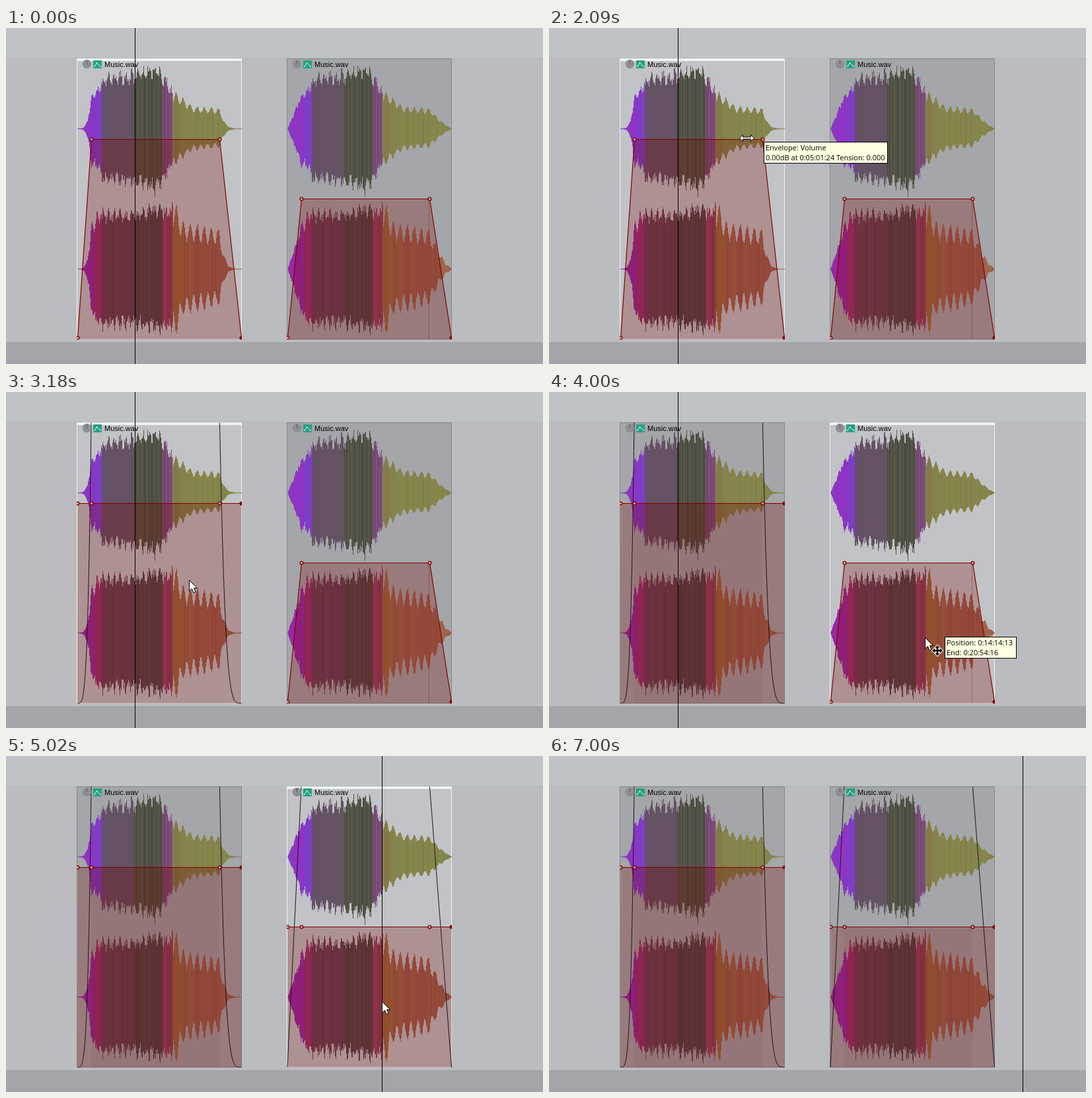
These frames come from a looping animation (813x508 px, 7.72 s). An HTML page with a canvas:

```html
<!DOCTYPE html>
<html lang="en">
<head>
<meta charset="utf-8">
<title>Volume envelope to item fades</title>
<style>
  html, body { margin: 0; width: 100%; height: 100%; overflow: hidden; background: #bbbcc0; }
  canvas { display: block; }
</style>
</head>
<body>
<canvas id="stage" width="813" height="508"></canvas>
<script>
const ctx = document.getElementById('stage').getContext('2d');
const LOOP = 7720, SELECT = 3998, DROP = 4100, DESELECT = 6120;
const TOP = 46, BOTTOM = 471, WIDTH = 250;
const FADE_IN = 21, FADE_OUT = 33, LENGTH = 248;
const RED = '#800000';

// Loudness as a few [x, height] points; each zone mixes a base and an accent colour.
const ZONES = [0, 25, 37, 85, 129, 144, 160];
const channels = [
  {
    mid: 152.5, dip: 0.25,
    loud: [[0, 57], [25, 60], [40, 88], [85, 92], [118, 105], [129, 90], [145, 60], [175, 35], [215, 32], [248, 20]],
    base: ['#9430c4', '#8a38d0', '#5c5a52', '#444640', '#8a4e86', '#8a6a48', '#80904c'],
    accent: ['#8040c8', '#6a48b0', '#6e4a78', '#5c5c4a', '#6a4868', '#7f8f4a', '#8a7a4c']
  },
  {
    mid: 364.5, dip: 0.38,
    loud: [[0, 68], [21, 72], [32, 94], [85, 95], [115, 103], [152, 102], [158, 75], [215, 62], [248, 30]],
    base: ['#a420ac', '#b03460', '#544648', '#464440', '#a84668', '#98783c', '#a06f4b'],
    accent: ['#9030a0', '#8a3080', '#78405f', '#644850', '#784058', '#a06040', '#9a5850']
  }
];

const items = [
  { x: 107, envY: 168, curve: 4, fadesAt: 3180, selected: t => t < SELECT },
  { x: 425, envY: 258, curve: 1, fadesAt: 5020, seam: true, selected: t => t >= SELECT && t < DESELECT }
];

const moves = [
  { from: 1370, to: 2090, steps: 13, pts: [[225, 428], [216, 350], [262, 215], [299, 167]] },
  { from: 2160, to: 2620, steps: 8, pts: [[307, 159], [300, 190], [277, 284]] },
  { from: 3620, to: SELECT, steps: 7, pts: [[277, 284], [569, 371]] },
  { from: 5520, to: 5940, steps: 6, pts: [[570, 371], [641, 435], [783, 283], [717, 266]] },
  { from: 6650, to: 7000, steps: 6, pts: [[717, 266], [742, 341], [759, 181]] }
];

const noise = n => { const v = Math.sin(n * 12.9898) * 43758.5453; return v - Math.floor(v); };

function level(pts, x) {
  const i = Math.max(1, pts.findIndex(p => p[0] >= x));
  const [x0, y0] = pts[i - 1], [x1, y1] = pts[i];
  return y0 + (y1 - y0) * (x - x0) / (x1 - x0);
}

function along(pts, u) {
  const s = u * (pts.length - 1), i = Math.min(Math.floor(s), pts.length - 2), f = s - i;
  return [0, 1].map(k => Math.round(pts[i][k] + (pts[i + 1][k] - pts[i][k]) * f));
}

function rect(x, y, w, h, color) {
  ctx.fillStyle = color;
  ctx.fillRect(x, y, w, h);
}

function path(pts, { fill, stroke, width = 1, close = false }) {
  ctx.beginPath();
  pts.forEach(([x, y]) => ctx.lineTo(x, y));
  if (close) ctx.closePath();
  if (fill) { ctx.fillStyle = fill; ctx.fill(); }
  if (stroke) { ctx.strokeStyle = stroke; ctx.lineWidth = width; ctx.stroke(); }
}

function dot(x, y, r, fill, stroke) {
  ctx.beginPath();
  ctx.arc(x, y, r, 0, 7);
  ctx.fillStyle = fill;
  ctx.fill();
  if (stroke) { ctx.strokeStyle = stroke; ctx.lineWidth = 1.3; ctx.stroke(); }
}

function text(s, x, y, font) {
  ctx.fillStyle = '#000';
  ctx.font = font;
  ctx.fillText(s, x, y);
}

const gain = (x, curve) => Math.min(1, x / FADE_IN, (LENGTH - x) / FADE_OUT) ** curve;

// Ragged spikes in the loud part, slow and regular ones in the tail.
function ripple(x, dip, seed) {
  const tail = x > 144;
  const beat = Math.cos(Math.PI * (x - 160) / (tail ? 10.6 : 8.7)) ** 2;
  return 1 - (tail ? dip : 0.14) * (1 - beat) - (tail ? 0.08 : 0.17) * noise(x + seed);
}

function drawWave(item) {
  channels.forEach((ch, c) => {
    for (let x = 0; x <= LENGTH; x++) {
      const height = level(ch.loud, x) * gain(x, item.curve);
      const up = height * ripple(x, ch.dip, 300 + c * 900);
      const down = height * ripple(x, ch.dip, 600 + c * 900) * (1 - 0.15 * (x / LENGTH) ** 3);
      const zone = ZONES.filter(z => z <= x).length - 1;
      const column = [item.x + 1 + x, ch.mid - 0.5 - up, 1, up + down + 1];
      rect(...column, ch.base[zone]);
      ctx.globalAlpha = noise(x + 50 + c * 400);
      rect(...column, ch.accent[zone]);
      ctx.globalAlpha = 1;
    }
  });
}

function drawEnvelope(item, flat, selected) {
  const { x, envY } = item;
  const endY = flat ? envY : 468;
  const nodes = [[x + 1, endY], [x + 22, envY], [x + 216, envY], [x + 249, endY]]
    .map(([a, b]) => [a + 0.5, b + 0.5]);
  path([...nodes, [x + 249.5, BOTTOM], [x + 1, BOTTOM]], { fill: 'rgba(122,0,0,.26)' });
  if (flat && !selected) rect(x + 22, envY, 194, BOTTOM - envY, 'rgba(90,20,30,.05)');
  if (!flat && item.seam) rect(x + 215, envY, 1, BOTTOM - envY, 'rgba(140,0,0,.3)');

  if (flat) {
    const rise = [], fall = [];
    for (let i = 0; i <= 40; i++) {
      const u = i / 40, y = BOTTOM - 0.5 - 424 * u ** item.curve;
      rise.push([x + 1 + FADE_IN * u, y]);
      fall.push([x + 249.5 - FADE_OUT * u, y]);
    }
    [rise, fall].forEach(p => path(p, { stroke: '#1c1416' }));
  }
  path(nodes, { stroke: RED, width: 1.2 });
  nodes.forEach(([a, b], i) => dot(a, b, 2.4, i === 3 ? RED : '#c9a0a2', RED));
}

function drawHeader(x) {
  dot(x + 15.5, 54.5, 6.7, '#8e8f90');
  rect(x + 15, 49, 1, 6, '#5c5d5e');
  rect(x + 25, 49, 13, 12, '#26a085');
  const glyph = [[27, 58], [30.5, 53], [36, 58]].map(([a, b]) => [x + a, b]);
  path(glyph, { stroke: '#d5f2ea' });
  glyph.forEach(([a, b]) => dot(a, b, 0.9, '#d5f2ea'));
  text('Music.wav', x + 42, 59, '11px "Liberation Sans", Arial, sans-serif');
}

function drawItem(item, t) {
  const { x } = item, selected = item.selected(t);
  rect(x, TOP, WIDTH, BOTTOM - TOP, selected ? '#f0f1f3' : '#858789');
  rect(x + 1, TOP + 1, WIDTH - 2, BOTTOM - TOP - 2, selected ? '#c1c3c6' : '#a4a6a9');
  if (selected) rect(x, TOP, WIDTH, 4, '#f0f1f4');
  ctx.save();
  ctx.beginPath();
  ctx.rect(x, TOP, WIDTH, BOTTOM - TOP);
  ctx.clip();
  drawWave(item);
  drawEnvelope(item, t >= item.fadesAt, selected);
  ctx.restore();
  drawHeader(x);
}

function drawTip(x, y, w, lines) {
  rect(x, y, w, 33, '#000');
  rect(x + 1, y + 1, w - 2, 31, '#ffffe1');
  lines.forEach((s, i) => text(s, x + 3, y + 13 + 15 * i, '11px "Open Sans", "Noto Sans", sans-serif'));
}

const ARROW = [[0, 0], [0, 16.5], [4, 13], [6.5, 19], [9.5, 18], [7, 12], [12, 12]];
const HALF = [[6, -1.5], [6, -5], [11, 0], [6, 5], [6, 1.5]];
const RESIZE = [...HALF, ...HALF.map(([x, y]) => [-x, -y])];
const HEAD = [[1.2, 1.2], [1.2, 4], [3.5, 4], [0, 8], [-3.5, 4], [-1.2, 4], [-1.2, 1.2]];

function drawShape(pts, x, y) {
  path(pts.map(([a, b]) => [x + a + 0.5, y + b + 0.5]), { fill: '#fff', stroke: '#000', close: true });
}

function drawMoveCross(x, y) {
  for (const stroke of ['#fff', null]) {
    for (let i = 0; i < 4; i++) {
      ctx.save();
      ctx.translate(x, y);
      ctx.rotate(i * Math.PI / 2);
      path(HEAD, { fill: '#000', stroke, width: 2, close: true });
      ctx.restore();
    }
  }
  rect(x - 1.5, y - 1.5, 3, 3, '#000');
}

function drawCursor(t) {
  const m = moves.filter(v => v.from <= t + 2).pop();
  if (!m || t >= 6998) return;
  const step = Math.min(m.steps, Math.floor((t - m.from + 2) * m.steps / (m.to - m.from)));
  const [x, y] = along(m.pts, step / m.steps);

  if (t < 2620 && Math.abs(y - 167) < 9) {
    drawShape(RESIZE, x, y - 1);
    drawTip(x + 26, y + 5, 188, ['Envelope: Volume', '0.00dB at 0:05:01:24 Tension: 0.000']);
    return;
  }
  if (x > 675) {
    ctx.setLineDash([1, 1]);
    ctx.strokeStyle = '#000';
    ctx.lineWidth = 1;
    ctx.strokeRect(x - 4.5, y - 4.5, 9, 9);
    ctx.setLineDash([]);
  }
  drawShape(ARROW, x, y);
  if (t >= SELECT && t < DROP) {
    drawMoveCross(x + 19, y + 20);
    drawTip(x + 30, y - 1, 109, ['Position: 0:14:14:13', 'End: 0:20:54:16']);
  }
}

function draw(t) {
  rect(0, 0, 813, 508, '#bbbcc0');
  rect(0, 0, 813, 45, '#bfc3c5');
  rect(0, 45, 813, 1, '#b4b7b9');
  rect(0, 475, 813, 33, '#a4a5a8');
  items.forEach(item => drawItem(item, t));
  rect(t < DROP ? 195 : t < DESELECT ? 569 : 717, 0, 1, 508, '#000');
  drawCursor(t);
}

const start = performance.now();
function frame() {
  draw((performance.now() - start) % LOOP);
  requestAnimationFrame(frame);
}
frame();
</script>
</body>
</html>
```
